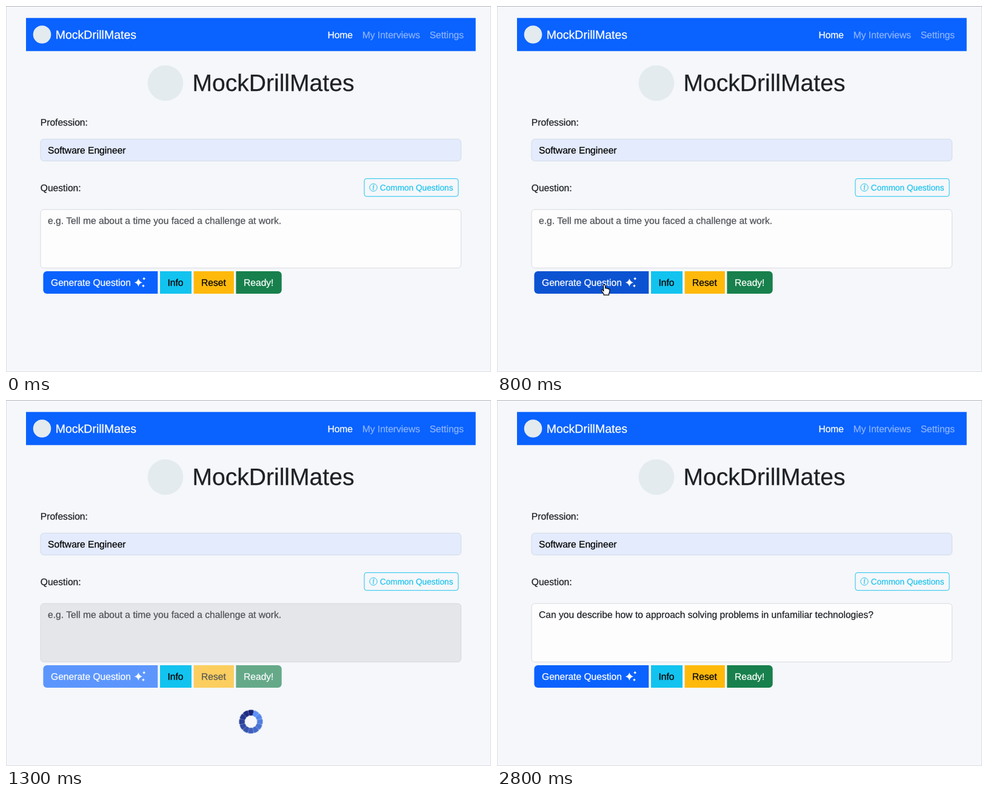
Recreate the animation shown at these times as an HTML page. Size 800 by 603 pixels, loop 2.9 s.

```html
<!DOCTYPE html>
<html lang="en">
<head>
<meta charset="utf-8">
<title>MockDrillMates</title>
<style>
  html, body { margin: 0; width: 100%; height: 100%; overflow: hidden; background: #f5f7fa; }
  svg { display: block; width: 800px; height: 603px; }
  text {
    --ink: #1e2125;
    font: 15.62px "Liberation Sans", Arial, sans-serif;
    fill: var(--ink);
    stroke: var(--ink);
    stroke-width: .25px;
    text-rendering: geometricPrecision;
    white-space: pre;
  }
  .title { font-size: 39.1px; }
  .brand { font-size: 19.52px; }
  .small { --ink: #1fc3ee; font-size: 13.67px; }
  .white { --ink: #fff; }
  .muted { --ink: #8bb3ff; }
  .black { --ink: #000; }
  .hint { --ink: #4e5156; }
  .line { fill: none; stroke: #1fc3ee; }

  .anim { animation: 2900ms step-end -1ms infinite; }
  .busy { animation-name: busy; }
  .generate { animation-name: hover; }
  .area { animation-name: area; }
  .hint { animation-name: hint; }
  .answer { animation-name: answer; }
  .spinner { animation-name: spinner; }
  .cursor { animation-name: move; }
  .arrow { animation-name: arrow; }
  .hand { animation-name: hand; }
  #wheel { animation: turn 2900ms steps(29) -1ms infinite; }

  @keyframes busy { 0%, 58.62% { opacity: 1 } 31.034% { opacity: .65 } }
  @keyframes hover {
    0%, 31.034% { fill: #0a62ff }
    24.137% { fill: #0b5ae4 }
    27.586% { fill: #0c53d2 }
  }
  @keyframes area {
    0%, 58.62% { fill: #fdfdfe; stroke: #d8dbe0 }
    31.034% { fill: #e5e6ea; stroke: #d6d8dd }
  }
  @keyframes hint { 0% { opacity: 1 } 58.62%, 100% { opacity: 0 } }
  @keyframes answer { 0% { opacity: 0 } 58.62%, 100% { opacity: 1 } }
  @keyframes spinner { 0%, 58.62% { opacity: 0 } 31.034% { opacity: 1 } }
  @keyframes turn { to { transform: rotate(870deg) } }
  @keyframes move {
    0% { transform: translate(283px, 581px) }
    10.344% { transform: translate(280px, 578px) }
    13.793% { transform: translate(277px, 573px) }
    17.241% { transform: translate(252px, 543px) }
    20.689% { transform: translate(213px, 497px) }
    24.137% { transform: translate(184px, 465px) }
    27.586% { transform: translate(177px, 459px) }
    31.034% { transform: translate(168px, 459px) }
    34.482% { transform: translate(92px, 461px) }
    37.931%, 100% { transform: translate(1.5px, 462.5px) }
  }
  @keyframes arrow {
    0%, 24.137%, 41.379% { opacity: 0 }
    6.896%, 31.034% { opacity: 1 }
  }
  @keyframes hand { 0%, 31.034% { opacity: 0 } 24.137% { opacity: 1 } }
</style>
</head>
<body>
<svg viewBox="0 0 800 603">
  <rect width="800" height="603" fill="#f5f7fa"/>
  <path d="M.5 0V603M799.5 0V603M0 602.5H800" stroke="#dcdee2"/>
  <path d="M0 .5H800" stroke="#b5b7ba"/>

  <rect x="33" y="19.7" width="741.7" height="54.6" fill="#0a62ff"/>
  <circle cx="59.5" cy="47" r="14.8" fill="#e3ebef"/>
  <text class="brand white" x="81.7" y="54">MockDrillMates</text>
  <text class="white" x="530.4" y="52.5">Home</text>
  <text class="muted" x="587.7" y="52.5">My Interviews</text>
  <text class="muted" x="698.7" y="52.5">Settings</text>

  <circle cx="263" cy="127" r="29.3" fill="#e3ebef"/>
  <text class="title" x="307.4" y="140.3">MockDrillMates</text>

  <text x="56.8" y="196.8">Profession:</text>
  <rect x="57" y="219.3" width="693.6" height="36" rx="5.5" fill="#e3ebfd" stroke="#d3dae6"/>
  <text class="black" x="69.1" y="242.7">Software Engineer</text>

  <text x="56.8" y="304.5">Question:</text>
  <rect class="line" x="591" y="284.4" width="155" height="29.3" rx="3.8"/>
  <circle class="line" cx="606" cy="299" r="6.2"/>
  <path class="line" d="M604.9 297.6H606.5L605.5 302.2H606.8" stroke-width="1.1"/>
  <circle cx="606.6" cy="295.5" r=".9" fill="#1fc3ee"/>
  <text class="small" x="616.8" y="303.6">Common Questions</text>

  <rect class="anim area" x="57" y="335.3" width="693.6" height="96.4" rx="5.5"/>
  <text class="anim hint" x="69.1" y="358.7">e.g. Tell me about a time you faced a challenge at work.</text>
  <text class="anim answer" x="69.1" y="358.7">Can you describe how to approach solving problems in unfamiliar technologies?</text>

  <g class="anim busy">
    <path class="anim generate" d="M250.3 437H67.4a6 6 0 0 0-6 6v25a6 6 0 0 0 6 6H250.3z"/>
    <text class="white" x="74" y="461">Generate Question</text>
    <g fill="#fff">
      <path id="star" d="M0-6.6Q1.3-1.3 6.6 0Q1.3 1.3 0 6.6Q-1.3 1.3-6.6 0Q-1.3-1.3 0-6.6" transform="translate(218.4 455.6)"/>
      <use href="#star" transform="translate(140.3 266.9) scale(.4)"/>
      <use href="#star" transform="translate(139.1 278.8) scale(.4)"/>
    </g>
  </g>
  <rect x="254" y="437" width="52" height="37" fill="#12c3ef"/>
  <text class="black" x="266.4" y="461">Info</text>
  <g class="anim busy">
    <rect x="309.6" y="437" width="66.3" height="37" fill="#ffb90b"/>
    <text class="black" x="322" y="461">Reset</text>
  </g>
  <g class="anim busy">
    <path d="M379.4 437H448.7a6 6 0 0 1 6 6v25a6 6 0 0 1-6 6H379.4z" fill="#17804c"/>
    <text class="white" x="392" y="461">Ready!</text>
  </g>

  <g class="anim spinner">
    <g transform="translate(404 530)"><g id="wheel"></g></g>
  </g>

  <g class="anim cursor">
    <path class="anim arrow" d="M0 0V14.4L3.3 11.3L5.6 16.6L8 15.6L5.7 10.4H10.2Z" fill="#000" stroke="#fff" stroke-width="1.1" stroke-linejoin="round"/>
    <path class="anim hand" d="M-1.6 1.4C-1.6-.4 1.2-.4 1.3 1.4L1.7 6.2C2.4 5.2 4 5.5 4.2 6.7C5 5.9 6.5 6.2 6.7 7.4C7.6 6.8 9 7.3 9 8.7C9.1 11.7 8.4 13 7.6 14.5V17.2H-.9V15.2C-2.4 13.4-3.8 11.6-4.6 9.9C-5.1 8.6-3.4 7.9-2.5 9.1L-1.1 10.8Z" fill="#fff" stroke="#000" stroke-width="1.2" stroke-linejoin="round"/>
  </g>
</svg>
<script>
  const wheel = document.getElementById('wheel');
  const mix = (a, b, k) => Math.round(a + (b - a) * k);
  for (let i = 0; i < 12; i++) {
    const k = i / 11;
    const blade = document.createElementNS(wheel.namespaceURI, 'path');
    blade.setAttribute('d', 'M-3.6-19.2A19.6 19.6 0 0 1 3.6-19.2Q4.8-18.6 4.5-17.2L2.9-10.9Q2.4-9.8 1.3-10A10 10 0 0 0-1.3-10Q-2.4-9.8-2.9-10.9L-4.5-17.2Q-4.8-18.6-3.6-19.2');
    blade.setAttribute('transform', `rotate(${i * 30})`);
    blade.setAttribute('fill', `rgb(${mix(92, 24, k)},${mix(146, 34, k)},${mix(248, 118, k)})`);
    wheel.append(blade);
  }
</script>
</body>
</html>
```
